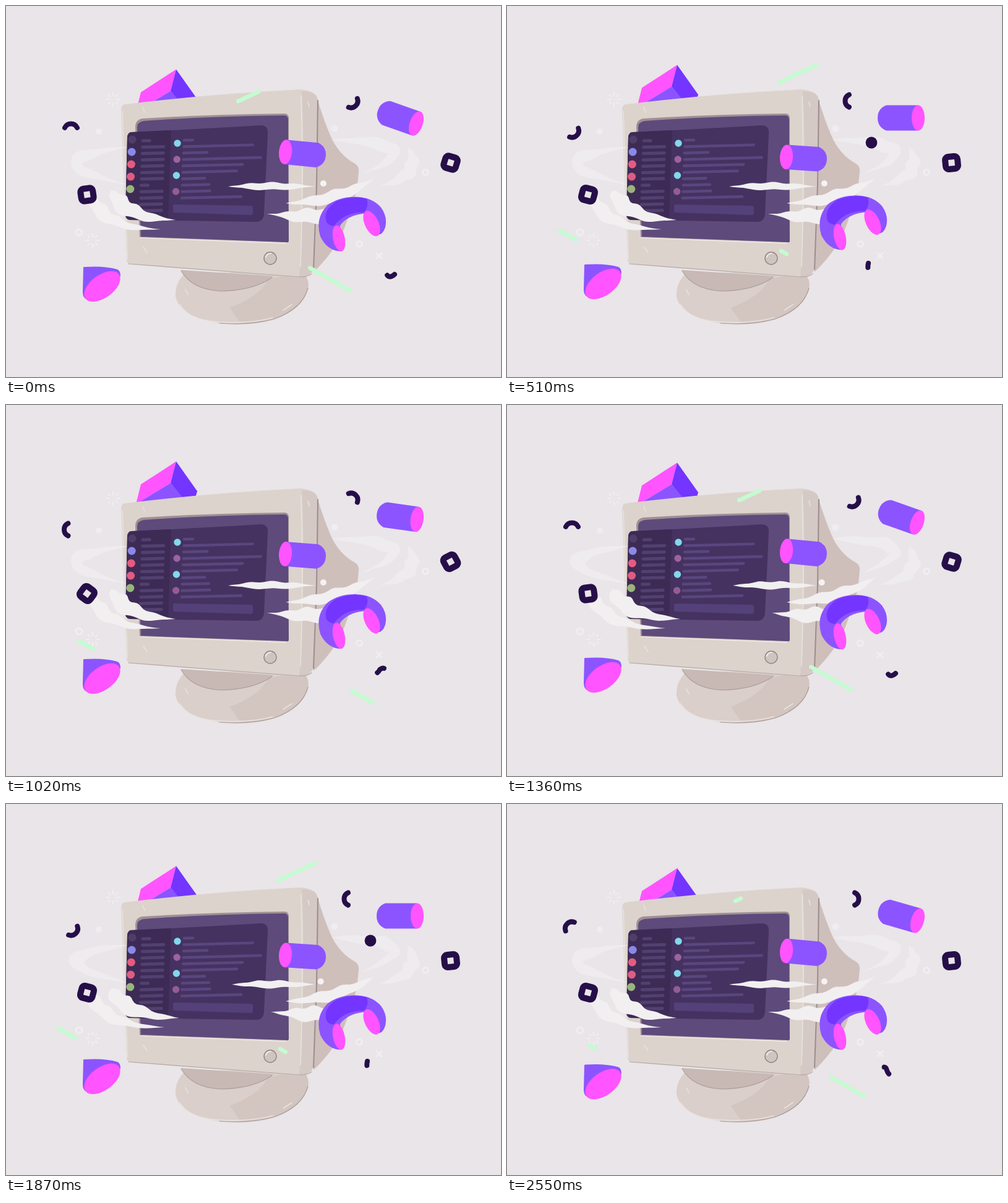
These frames come from a looping animation (800 px wide and 600 px high, 2720 ms). An HTML page:

```html
<!DOCTYPE html>
<html lang="en">
<head>
<meta charset="utf-8">
<title>Floating monitor</title>
<style>
html, body { margin: 0; width: 100%; height: 100%; overflow: hidden; background: #e9e5e8; }
svg { display: block; width: 100vw; height: 100vh; }
.line { fill: none; stroke-linecap: round; stroke-linejoin: round; }
.ink { stroke: #260e49; stroke-width: 8; }
.mint { stroke: #c4fbd1; stroke-width: 6.5; }
.pale { stroke: #f1eef1; stroke-width: 2.2; }
.violet { fill: #8c54ff; }
.blue { fill: #7335ff; }
.pink { fill: #ff54ff; }
</style>
</head>
<body>
<svg viewBox="0 0 800 600">
  <defs>
    <path id="spark" d="M0 -11v5M0 6v5M-11 0h5M6 0h5M-7 -7l2 2M7 -7l-2 2M-7 7l2 -2M7 7l-2 -2"/>
    <g id="cylinder">
      <path class="violet" d="M-24 -20.500H27V20.500H-24Q-38 15 -38 0Q-38 -15 -24 -20.500Z"/>
      <ellipse class="pink" cx="27.500" rx="10.500" ry="20.500"/>
    </g>
    <rect id="box" x="-10" y="-10" width="20" height="20" rx="5" stroke-width="10"/>
    <path id="arc" d="M-10 -4.600A11 11 0 0 1 10 -4.600"/>
  </defs>
  <rect width="800" height="600" fill="#e9e5e8"/>

  <g class="line pale">
    <use href="#spark" x="173" y="151"/>
    <use href="#spark" x="140" y="379"/>
    <path d="M599 400l8 8M607 400l-8 8" stroke-width="3"/>
    <g stroke-width="3">
      <circle cx="118" cy="366" r="5"/>
      <circle cx="678" cy="269" r="4.500"/>
      <circle cx="571" cy="385" r="4.500"/>
    </g>
  </g>
  <g fill="#f0edf0"><circle cx="150" cy="203" r="5"/><circle cx="531" cy="198" r="5.500"/></g>

  <g id="prism">
    <path class="pink" d="M275 91L218 128L210 160L266 126Z"/>
    <path class="blue" d="M275 91L309 139L306 150H285L266 126Z"/>
    <path class="violet" d="M266 126L286 150L210 160Z"/>
  </g>

  <!-- stand -->
  <path fill="#dacfca" d="M274 470Q273 446 291 431L478 431Q491 440 488 456Q480 489 434 506Q397 517 345 513Q281 503 274 470Z"/>
  <path fill="#d3c5c0" d="M424 442Q450 436 478 431Q491 440 488 456Q480 489 434 506Q408 513 380 514Q368 497 362 488Q410 470 424 442Z"/>
  <path fill="#c8b9b5" d="M283 427Q300 458 345 461Q398 461 432 437Z"/>
  <path class="line" stroke="#ab9c9a" stroke-width="1.200" d="M283 428Q300 458 345 461Q398 461 430 439M488 456Q480 489 434 506Q397 517 345 513"/>
  <path class="line" stroke="#eae3de" stroke-width="1.500" d="M281 483Q295 508 345 511Q395 514 431 504M290 459l4 8M448 492l14-9"/>

  <!-- casing -->
  <path fill="#cfbfbb" d="M503 150Q514 186 524 209Q537 240 564 255Q571 259 570 268L567 298Q552 348 541 374Q522 407 497 430Z"/>
  <path fill="#dcd3cd" d="M192 159Q330 142 476 135Q503 137 504 153L502 290L497 424Q494 438 472 439L202 418Q196 417 195 411L186 168Q186 160 192 159Z"/>
  <path fill="#d4c9c4" d="M478 138Q503 138 504 153L502 290L497 424Q494 437 474 438Q479 370 480 290Q482 200 478 138Z"/>
  <path class="line" stroke="#9c8c8e" stroke-width="2" d="M504 153L502 290L497 426"/>
  <path class="line" stroke="#b5a8a5" stroke-width="1.200" d="M198 417L472 438Q486 439 494 433"/>
  <path class="line" stroke="#e9e3de" stroke-width="1.500" d="M188 170L196 409M221 164l3 8M477 146Q481 290 476 422M222 390l6 9M488 155l2 8"/>

  <!-- screen -->
  <path fill="#a08f93" d="M209 196Q209 184 220 182Q330 175 450 174Q457 174 457 182L456 382L216 374Z"/>
  <path fill="#5e4a7b" d="M212 196Q212 188 222 186Q330 178 450 177Q456 177 456 185L457 380Q457 383 453 382L218 373Z"/>
  <path class="line" stroke="#ece5e0" stroke-width="1.500" d="M216 375L452 384"/>
  <path fill="#453260" d="M203 204Q315 199 411 193Q424 193 423 206L417 336Q416 349 404 349L200 346Q193 345 193 337L196 212Q197 204 203 204Z"/>
  <path fill="#3d2b56" d="M203 204L267 201L262 347L200 346Q193 345 193 337L196 212Q197 204 203 204Z"/>
  <path fill="#54417a" d="M272 321L397 323Q399 324 399 327V335Q399 338 396 338L272 334Q270 334 270 331V323Q270 321 272 321Z"/>
  <g id="rows" class="line"></g>
  <g id="dots"></g>
  <circle cx="427" cy="408" r="10" fill="#d0c4bf" stroke="#908285" stroke-width="1.400"/>
  <path class="line" stroke="#efe9e4" stroke-width="2" d="M420 406Q422 400 428 400"/>

  <path id="haze" fill="#efecef"/>
  <path id="smoke" fill="#f2eff1"/>
  <circle id="puff" cy="287" r="5" fill="#f5f2f3"/>

  <g id="cone">
    <path class="violet" d="M125 424Q124 422 127 422Q160 420 180 426Q185 428 185 437L130 474Q124 472 124 462Z"/>
    <ellipse class="pink" cx="155.500" cy="453.500" rx="33.500" ry="18.500" transform="rotate(-36 155.500 453.500)"/>
  </g>
  <use id="cylL" href="#cylinder"/>
  <use id="cylR" href="#cylinder"/>
  <g id="shoe">
    <path class="violet" d="M541 394Q519 393 508 370Q499 340 520 319Q540 305 567 306Q592 307 606 323Q617 338 613 355Q609 367 602 367L578 333Q552 336 540 352Z"/>
    <path class="blue" d="M517 343Q514 326 534 313Q560 303 583 309Q587 320 579 331Q547 330 530 353Q518 352 517 343Z"/>
    <ellipse class="pink" cx="538" cy="373" rx="9.500" ry="21.500" transform="rotate(-12 538 373)"/>
    <ellipse class="pink" cx="591" cy="349" rx="11" ry="22" transform="rotate(-25 591 349)"/>
  </g>

  <g class="line ink">
    <use id="boxL" href="#box"/>
    <use id="boxR" href="#box"/>
    <use id="arcL" href="#arc"/>
    <use id="arcR" href="#arc"/>
    <path id="worm" pathLength="100" stroke-dasharray="20 200" d="M584 416Q581 428 590 433Q600 437 604 428Q612 422 614 431Q618 443 628 434"/>
  </g>
  <circle id="ball" cx="589" cy="221" fill="#260e49"/>
  <g class="line mint"><path id="dashA"/><path id="dashB"/><path id="dashC"/></g>
</svg>
<script>
const $ = id => document.getElementById(id);
const set = (id, name, value) => $(id).setAttribute(name, value);
const pose = (id, x, y, turn = 0, more = "") =>
  set(id, "transform", `translate(${x} ${y}) rotate(${turn})${more}`);

const STEP = 170, COUNT = 16, HALF = 8, TAU = 2 * Math.PI;

// Screen contents
const bar = (x, y, w, color, size) =>
  `<path d="M${x} ${y}l${w} ${-w * 0.025}" stroke="${color}" stroke-width="${size}"/>`;
const chat = [14, 111, 38, 125, 96, 87, 36, 43, 45, 96]
  .map((w, i) => bar(288 - i * 0.45, 217 + i * 10.4, w, "#5a467f", 4.5));
const menu = Array.from({ length: 12 }, (_, i) =>
  bar(221 - i * 0.35, 218 + i * 10.3, i % 7 ? 34 : 11, "#524071", 5));
$("rows").innerHTML = chat.concat(menu).join("");

const column = (colors, x, y, gap, r) => colors.map((c, i) =>
  `<circle cx="${x - i * 0.8}" cy="${y + i * gap}" r="${r}" fill="${c}"/>`).join("");
$("dots").innerHTML =
  column(["#503e69", "#8a89e8", "#e55b80", "#df5c83", "#9ab47d"], 204, 216, 20, 6.5) +
  column(["#82d8ec", "#9c649f", "#82d8ec", "#935d94"], 277, 222, 26, 5.7);

// Tapered ribbon along a quadratic curve; a low lean puts the bulk near its start
function ribbon([x0, y0, x1, y1, x2, y2], width, lean, phase) {
  const left = [], right = [], N = 24;
  for (let i = 0; i <= N; i++) {
    const t = i / N, s = 1 - t;
    const x = s * s * x0 + 2 * s * t * x1 + t * t * x2;
    const y = s * s * y0 + 2 * s * t * y1 + t * t * y2;
    const dx = s * (x1 - x0) + t * (x2 - x1), dy = s * (y1 - y0) + t * (y2 - y1);
    const len = Math.hypot(dx, dy);
    const half = width / 2 * Math.sin(Math.PI * t ** lean);
    const edge = (k, side) => {
      const h = half * (1 + 0.2 * Math.sin(t * k + phase)) * side / len;
      return `${(x - dy * h).toFixed(1)} ${(y + dx * h).toFixed(1)}`;
    };
    left.push(edge(17, 1));
    right.unshift(edge(23, -1));
  }
  return `M${left.concat(right).join("L")}Z`;
}

function drawSmoke(phase) {
  const pull = 4 * Math.cos(phase);
  set("haze", "d",
    ribbon([196, 228, 30, 250, 196, 289], 20, 0.9, phase) +
    ribbon([526, 216, 700, 222, 574, 272], 20, 0.8, phase) +
    ribbon([650, 229, 676, 275, 604, 291], 22, 0.8, phase));
  set("smoke", "d",
    ribbon([138, 309, 160, 361, 252 + pull, 361], 22, 0.45, phase) +
    ribbon([170, 298, 190, 343, 276 + pull, 346], 26, 0.6, phase) +
    ribbon([361 + pull, 292, 425, 291, 500, 292], 12, 1, phase) +
    ribbon([424 + pull, 336, 480, 343, 548, 337], 24, 1.4, phase) +
    ribbon([452, 319, 535, 317, 595, 279], 19, 1, phase));
  set("puff", "cx", 511.5 - 0.7 * pull);
}

// A dash whose front eases out while its back eases in
function dash(id, beat, from, to, y, slope) {
  const u = beat % HALF / 6;
  const lerp = f => from + (to - from) * f;
  const gap = Math.sign(to - from) * 9;
  const head = lerp(Math.sin(u * Math.PI / 2) ** 1.15) + gap, tail = lerp(u ** 1.75);
  const at = x => `${x} ${y + (x - from) * slope}`;
  set(id, "d", u > 1 ? "" : `M${at(tail)}L${at(head)}`);
}

function draw(step) {
  const beat = step % HALF;
  const wave = (turns, shift = 0) => Math.cos((step - shift) / COUNT * turns * TAU);

  pose("prism", 0, 6.8 + 6.5 * wave(1, 14));
  pose("cone", 0, -6.5 + 6.5 * wave(1));
  pose("shoe", 0, 2 + 2 * wave(1, 13));
  pose("cylL", 479, 243.1 - 4.3 * wave(2), 4.5 + wave(2), " scale(-1 .97)");
  pose("cylR", 637, 181, 8 + 11.5 * wave(2));

  pose("boxL", 131, 305, -8 - 22.5 * beat);
  pose("boxR", 718.5, 253.5, 17 + 22.5 * beat);
  pose("arcL", 105, 201.5, 45 * beat);
  pose("arcR", 557.5, 153.5, 135 + 45 * beat);
  set("worm", "stroke-dashoffset", 10 - 18 * ((beat + 5) % HALF));
  set("ball", "r", Math.max(0, 9.5 * Math.sin((beat - 0.5) / 5.5 * Math.PI)));

  dash("dashA", beat + 1, 369, 513, 157, -0.47);
  dash("dashB", beat + 3, 599, 452, 485, 0.57);
  dash("dashC", beat + 7, 76, 134, 358, 0.56);
  drawSmoke((step % 3 + 1) * TAU / 3);
}

let last = -1;
function tick() {
  const step = Math.floor(performance.now() / STEP) % COUNT;
  if (step !== last) draw(last = step);
  requestAnimationFrame(tick);
}
tick();
</script>
</body>
</html>
```
